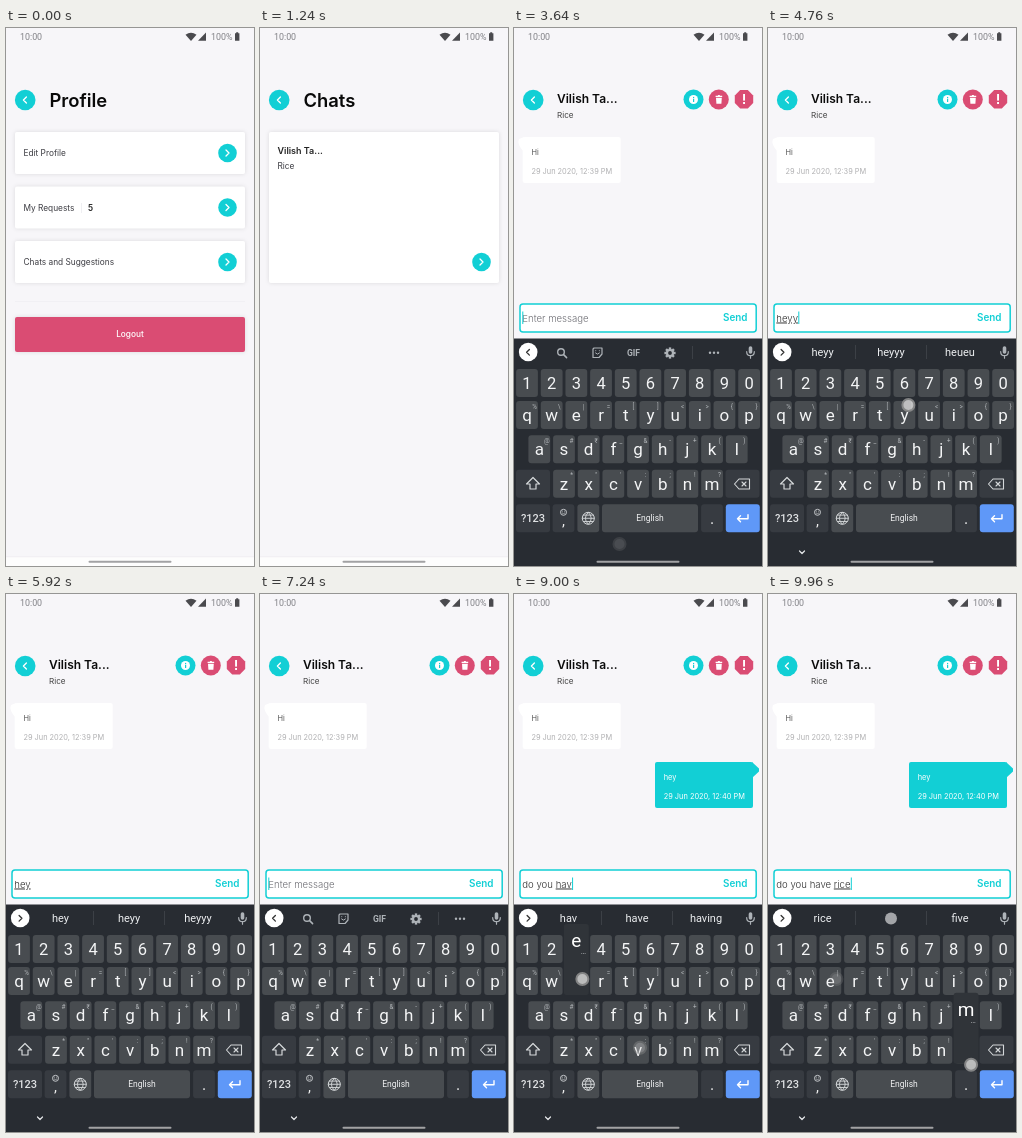
Recreate the animation shown at these times as an HTML page. Size 248x538 px, loop 10 s.

```html
<!DOCTYPE html>
<html lang="en">
<head>
<meta charset="utf-8">
<title>Chat flow</title>
<style>
html, body { margin: 0; width: 100%; height: 100%; overflow: hidden; background: #f7f6f9; }
svg { display: block; width: 248px; height: 538px; font-family: Inter, sans-serif; }
text { white-space: pre; }
.k { font-family: Roboto, sans-serif; }
.card { filter: drop-shadow(0 0 2px #0000001c); }
</style>
</head>
<body>
<svg id="stage" viewBox="0 0 248 538"></svg>
<script>
const LOOP = 10000, TEAL = '#12cfd5', PINK = '#da4c73', BG = '#f7f6f9', DARK = '#282c32';
const stage = document.getElementById('stage');

// Shape helpers
const rect = (x, y, w, h, fill, r = 0, more = '') =>
  `<rect x="${x}" y="${y}" width="${w}" height="${h}" rx="${r}" fill="${fill}" ${more}/>`;
const dot = (x, y, r, fill, more = '') => `<circle cx="${x}" cy="${y}" r="${r}" fill="${fill}" ${more}/>`;
const text = (x, y, size, s, fill = '#333', more = '') =>
  `<text x="${x}" y="${y}" font-size="${size}" fill="${fill}" ${more}>${s.replace(/&/g, '&amp;').replace(/</g, '&lt;')}</text>`;
const mid = (x, y, size, s, fill, more = '') => text(x, y, size, s, fill, 'text-anchor="middle" ' + more);
const line = (d, color, w = 1.2, fill = 'none') =>
  `<path d="${d}" fill="${fill}" stroke="${color}" stroke-width="${w}" stroke-linecap="round" stroke-linejoin="round"/>`;
const shape = (d, fill) => `<path d="${d}" fill="${fill}"/>`;
const chevron = (x, y, dir, color, s = 3) => line(`M${x - dir * s / 2} ${y - s}l${dir * s} ${s}l${-dir * s} ${s}`, color, 1.3);
const group = (id, body) => `<g id="${id}">${body}</g>`;

// Pages
const backButton = dot(19.2, 72, 10.3, TEAL) + chevron(18.9, 72, -1, '#fff');
const page = (id, body) => group(id, rect(0, 17, 248, 512, BG) + backButton + body);
const title = s => text(43.5, 78.5, 18.4, s, '#090909', 'font-weight="600"');
const card = (y, h = 42) => rect(9, y, 230, h, '#fff', 2, 'class="card"') +
  dot(221.5, y + h - 21, 9.3, TEAL) + chevron(221.5, y + h - 21, 1, '#fff');
const label = (y, s) => text(17.5, y, 8.3, s, '#3c3c42');

const profile = page('profile', title('Profile') +
  card(104) + label(128, 'Edit Profile') +
  card(158.5) + label(182.5, 'My Requests') + rect(75, 175, .6, 10, '#e5e5ea') +
  text(82, 182.7, 8.3, '5', '#222', 'font-weight="600"') +
  card(213) + label(237, 'Chats and Suggestions') +
  rect(9, 273, 230, .7, '#efeef2') +
  rect(9, 289, 230, 35, PINK, 2, 'class="card"') +
  mid(124, 309.3, 8.3, 'Logout', '#fff', 'font-weight="500"'));

const who = 'Vilish Ta...';
const list = page('list', title('Chats') + card(104, 151) +
  text(17.5, 126, 9, who, '#222', 'font-weight="600"') + label(141, 'Rice'));

const bubble = (x, y, s, time, fill, ink, dim) => rect(x, y, 98, 46, fill, 2) +
  text(x + 8.7, y + 18, 7.4, s, ink) + text(x + 8.7, y + 36.8, 7.4, time, dim);
const chat = page('chat',
  text(43, 75, 12, who, '#0b0b0b', 'font-weight="600"') + text(43, 89.7, 8.1, 'Rice', '#444') +
  dot(179.5, 71.5, 10, TEAL) + dot(179.5, 71.5, 4.5, '#fff') +
  rect(179, 70.8, 1.2, 3.2, TEAL) + rect(179, 68.9, 1.2, 1.2, TEAL) +
  dot(204.8, 71.5, 10, PINK) + shape('M202 69.8h5.8l-.4 6h-5zM201.6 67.8h2.1l.5-.7h1.4l.5.7h2.1v1.2h-6.6z', '#fff') +
  shape('M226.2 62h7.6l5.4 5.4v7.6l-5.4 5.4h-7.6l-5.4-5.4v-7.6z', PINK) +
  rect(229.1, 66, 1.9, 6.6, '#fff') + rect(229.1, 74, 1.9, 2, '#fff') +
  shape('M10 109L5 111Q2.5 116 10 124z', '#fff') +
  bubble(8.7, 109, 'Hi', '29 Jun 2020, 12:39 PM', '#fff', '#555', '#b0b0b2') +
  group('reply', shape('M238 168L245 174.5V177.5L238 184z', TEAL) +
    bubble(141, 168, 'hey', '29 Jun 2020, 12:40 PM', TEAL, '#fff', '#fff')) +
  group('field',
    rect(6, 495, 236.2, 28, '#fff', 3, 'id="frame"') +
    '<text id="entry" x="8.3" y="512.5" font-size="9.6" font-weight="300"></text>' +
    rect(0, 502.5, 1, 12.5, TEAL, 0, 'id="caret"') +
    text(209, 512.3, 9.9, 'Send', TEAL, 'id="send" font-weight="600"')));

// Keyboard
const keyAt = { ' ': [136, 490], '<': [228.5, 456], '>': [221, 289] };
const KEY = '#484c50', SIDE = '#373b41', ICON = '#aeb3b8';
const cap = (x, y, w, fill = KEY) => rect(x - w / 2, y - 14, w, 28, fill, 3);
const keyRow = (keys, hints, x0, y, size) => [...keys].map((c, i) => {
  const x = x0 + i * 24.68;
  keyAt[c] = [x, y];
  return cap(x, y, 21.8) + mid(x, y + size * .36, size, c, '#f4f5f6') +
    (hints ? mid(x + 7.5, y - 6.5, 6.3, hints[i], '#b4b8bb') : '');
}).join('');
const gear = Array.from({ length: 8 }, (_, i) =>
  `<rect x="154.8" y="319.4" width="2.4" height="3" fill="${ICON}" transform="rotate(${i * 45} 156 325)"/>`).join('');
const toolbar = group('toolbar', chevron(14, 324.3, -1, '#333', 2.8) +
  dot(47, 324, 3.3, 'none', `stroke="${ICON}" stroke-width="1.4"`) + line('M49.6 326.6l3 3', ICON, 1.5) +
  line('M80 320h8v6l-3 3.5h-6v-8.5z', ICON) + line('M81.5 325q2 2.5 4 0M81.7 322.7h.1M85.3 322.7h.1', ICON, 1) +
  mid(119.5, 327.7, 8.6, 'GIF', ICON, 'font-weight="700"') +
  gear + dot(156, 325, 3, 'none', `stroke="${ICON}" stroke-width="2.2"`) +
  rect(178, 318, .7, 13, '#454a4f') + [196, 200, 204].map(x => dot(x, 324.7, 1.2, ICON)).join(''));
const words = group('words', chevron(14.5, 324.3, 1, '#333', 2.8) +
  rect(87, 317, .7, 14, '#454a4f') + rect(158, 317, .7, 14, '#454a4f') +
  [54.5, 123, 192].map((x, i) => mid(x, 328, 11, '', '#eceef0', `id="word${i}"`)).join('') +
  dot(123, 324.5, 6, '#a3a5a8', 'id="emoji"'));
const keyboard = group('keyboard', rect(0, 310.5, 248, 230, DARK) + dot(14.2, 324, 9.3, '#fff') + toolbar + words +
  rect(234.7, 318.2, 3.6, 7.5, ICON, 1.8) + line('M232.7 323.7q0 4 3.8 4t3.8-4M236.5 327.7v2.5', ICON) +
  keyRow('1234567890', '', 13, 355, 16.5) +
  keyRow('qwertyuiop', '%\\|=[]<>{}', 13, 387, 17) +
  keyRow('asdfghjkl', '@#₹_&-+()', 25.3, 421.3, 17) +
  keyRow('zxcvbnm', '*"\':;!?', 50, 455.8, 17) +
  cap(19, 455.8, 34, SIDE) + line('M19 449.5l-6.5 6.5h3.5v5h6v-5h3.5z', '#d5d8da') +
  cap(228.5, 455.8, 34, SIDE) + line('M225 451h10.5v10H225l-4.5-5zM228 454l4 4M232 454l-4 4', '#d5d8da', 1.1) +
  cap(19, 490.3, 34, SIDE) + mid(19, 494.2, 11, '?123', '#dfe1e3', 'font-weight="500"') +
  cap(49.5, 490.3, 21.8, SIDE) + mid(49.5, 498, 15, ',', '#eee') +
  dot(49.5, 484.3, 3, 'none', 'stroke="#c4c7ca"') + line('M48 485q1.5 1.6 3 0M48.4 483.2h.1M50.5 483.2h.1', '#c4c7ca', .7) +
  cap(74.3, 490.3, 21.8) + line('M68.3 490.3h12M74.3 484.3q-6 6 0 12q6-6 0-12M69.5 487.1h9.6M69.5 493.5h9.6', '#d5d8da', .9) +
  dot(74.3, 490.3, 6, 'none', 'stroke="#d5d8da"') +
  cap(136, 490.3, 96) + mid(136, 493.3, 8.5, 'English', '#f0f1f2') +
  cap(198, 490.3, 21.8, SIDE) + mid(198, 496, 16, '.', '#eee') +
  cap(228.8, 490.3, 34, '#5f98f8') + line('M234 486.8v4h-10.5m3-3l-3 3l3 3', '#fff', 1.4) +
  line('M31.5 523l2.5 2.5l2.5-2.5', '#e6e8ea').replace('<path', '<path id="hide"') +
  group('popup', rect(-12.5, -57, 25, 71, '#303439', 3) + mid(0, -34, 19, '', '#fff', 'id="big"') + mid(7, -27, 8, '…', '#d0d3d5')))
  .replace('<g ', '<g class="k" ');

const status = `<g class="k">${rect(0, 0, 248, 17, BG)}${text(14, 11.5, 8.9, '10:00', '#818186')}` +
  shape('M179.5 6.8Q185 2.5 190.5 6.8L185 13z', '#4a4a4e') + shape('M192 12.7h8v-8.3z', '#4a4a4e') +
  text(205, 11.5, 8.9, '100%', '#818186') + shape('M229 5.3h1.2v-1h2v1h1.2v7.5h-4.4z', '#4a4a4e') + '</g>';

stage.innerHTML = rect(0, 0, 248, 538, BG) + profile + list + chat +
  rect(0, 529, 248, 9, '#fdfdfd') + rect(0, 528.6, 248, .6, '#e8e7ea') + status + keyboard +
  rect(82.5, 532.7, 83, 2, '#a2a2a4', 1) + group('touches', '');

// Script of taps: [time, key]; '<' deletes, '>' sends
const taps = [[4100, 'h'], [4300, 'e'], [4500, 'y'], [4700, 'y'], [5300, '<'], [6800, '>'],
  ...[...'do you have rice'].map((c, i) => [7460 + i * 156, c]), [10010, 'm']];
const nudge = { y: [4, -10], u: [-4, -3], m: [5, 15], e: [6, -2] };
// Touches: [start, fade start, end, x, y]
const touches = [[40, 320, 500, 118, 242], [2000, 2250, 2540, 123, 242], [3040, 3440, 3700, 105.5, 516],
  ...taps.map(([at, c]) => {
    const [x, y] = keyAt[c], [dx, dy] = nudge[c] || [2, -2];
    return [at - 90, at + 60, at + 200, x + dx, y + dy];
  })];
const guesses = {
  h: 'h he hey', he: 'he hey her', hey: 'hey heyy heyyy', heyy: 'heyy heyyy heueu',
  d: 'd do did', do: 'do dont does', 'do ': 'you we they',
  y: 'y you yes', yo: 'yo you your', you: "you your you've", 'do you ': 'have want know',
  ha: 'ha have has', hav: 'hav have having', have: 'have haven having', 'do you have ': 'a any the',
  r: 'r are right', ri: 'ri right rice', ric: 'ric rice rich', rice: 'rice * five'
};

const $ = Object.fromEntries([...stage.querySelectorAll('[id]')].map(e => [e.id, e]));
const show = (el, on) => el.setAttribute('display', on ? 'inline' : 'none');
const shift = (el, x, y) => el.setAttribute('transform', `translate(${x} ${y})`);
const ease = (t, a, b) => 1 - (1 - Math.min(1, Math.max(0, (t - a) / (b - a)))) ** 3;

function typed(t) {
  let s = '', last = 3600;
  for (const [at, c] of taps) {
    if (at > t) break;
    s = c === '<' ? s.slice(0, -1) : c === '>' ? '' : s + c;
    last = at;
  }
  return [s, last];
}

function draw(t) {
  shift($.list, 248 * (1 - ease(t, 680, 1000)), 0);
  shift($.chat, 248 * (1 - ease(t, 2080, 2360)), 0);
  show($.reply, t >= 9000);

  const up = ease(t, 3320, 3600), focused = t >= 3200;
  shift($.keyboard, 0, 227 * (1 - up));
  show($.keyboard, up > 0);
  show($.hide, t >= 3680);
  shift($.field, 0, -219 * up);
  $.frame.setAttribute('stroke', focused ? TEAL : '#b5b5b9');
  $.frame.setAttribute('stroke-width', focused ? 1.5 : 1);
  show($.send, focused);

  const [s, last] = typed(t), word = s.split(' ').pop();
  $.entry.setAttribute('fill', s ? '#333' : '#707076');
  $.entry.innerHTML = s ? s.slice(0, s.length - word.length) + `<tspan text-decoration="underline">${word}</tspan>` : 'Enter message';
  $.caret.setAttribute('x', 8.3 + (s ? $.entry.getComputedTextLength() + .3 : 0));
  show($.caret, focused && (t < last || (t - last) % 1000 < 500));

  show($.toolbar, !s);
  show($.words, s);
  const options = (guesses[word || s] || word).split(' ');
  for (let i = 0; i < 3; i++) $['word' + i].textContent = (options[i] || '').replace('*', '');
  show($.emoji, options[1] === '*');

  const held = taps.find(([at, c]) => c >= 'a' && t >= at - 100 && t < at);
  show($.popup, held);
  if (held) {
    shift($.popup, ...keyAt[held[1]]);
    $.big.textContent = held[1];
  }
  $.touches.innerHTML = touches.filter(([a, , b]) => t >= a && t < b).map(([, fade, end, x, y]) =>
    dot(x, y, 6, '#d4d4d4', `stroke="#929292" stroke-width="2" opacity="${.85 * Math.min(1, (end - t) / (end - fade))}"`)).join('');
}

const start = performance.now();
function tick() {
  draw((performance.now() - start) % LOOP);
  requestAnimationFrame(tick);
}
tick();
</script>
</body>
</html>
```
